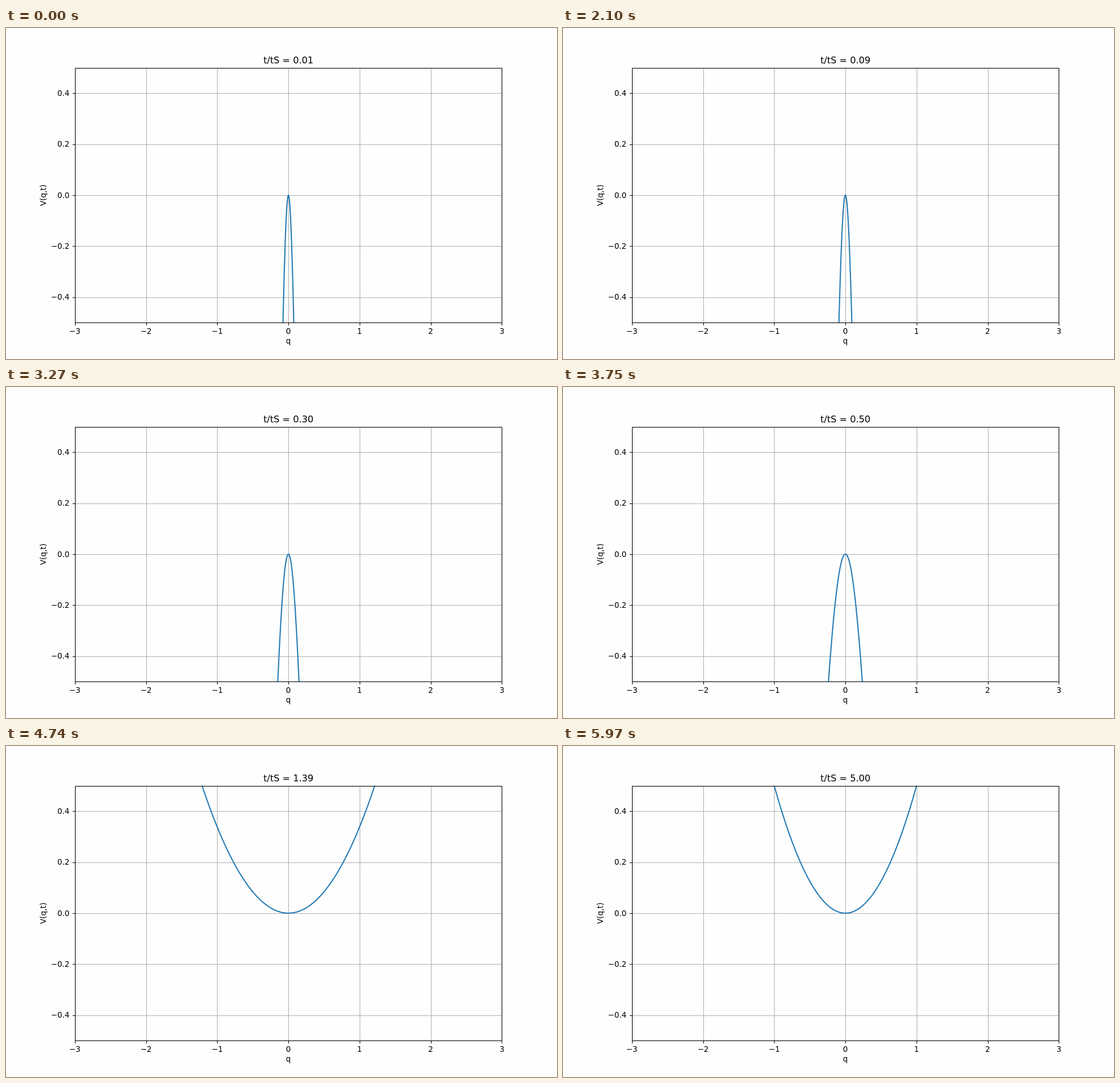
These frames come from a looping animation (966 by 580 pixels, 6 s). An HTML page:

```html
<!DOCTYPE html>
<html lang="en">
<head>
<meta charset="utf-8">
<title>V(q,t)</title>
<style>
  html, body { margin: 0; width: 100%; height: 100%; overflow: hidden; background: #fefefe; }
  svg { display: block; }
  text { font: 13.42px "DejaVu Sans", sans-serif; fill: #000; text-anchor: middle; }
  #title { font-size: 16.1px; }
  .end { text-anchor: end; }
  .grid { stroke: #b0b0b0; stroke-width: 1.07; }
  .axis { stroke: #000; stroke-width: 1.07; fill: none; }
  #curve { fill: none; stroke: #1f77b4; stroke-width: 2.01; stroke-linejoin: round; }
</style>
</head>
<body>
<svg id="stage" width="966" height="580" viewBox="0 0 966 580">
  <clipPath id="plot"><rect x="120.75" y="69.6" width="748.65" height="446.6"/></clipPath>
  <g id="grid"></g>
  <g clip-path="url(#plot)"><path id="curve"/></g>
  <g id="axes"></g>
  <text id="title" x="495.08" y="61.5"></text>
  <text x="495.08" y="553">q</text>
  <text transform="translate(70 293) rotate(-90)">V(q,t)</text>
</svg>
<script>
const LOOP = 6000, STEP = 30, LAST = LOOP / STEP - 1;
const T_MIN = 0.01, T_MAX = 5, DIM = 100, SAMPLES = 1000;
const byId = id => document.getElementById(id);
const px = q => 120.75 + (q + 3) * 748.65 / 6;
const py = v => 292.9 - v * 446.6;
const snap = n => Math.floor(n + 0.5) + 0.5;

function add(parent, tag, attrs, text = '') {
  const el = document.createElementNS('http://www.w3.org/2000/svg', tag);
  for (const key in attrs) el.setAttribute(key, attrs[key]);
  el.textContent = text;
  byId(parent).append(el);
}

function line(parent, cls, x1, y1, x2, y2) {
  add(parent, 'line', { class: cls, x1, y1, x2, y2 });
}

const left = snap(px(-3)), right = snap(px(3));
const top_ = snap(py(0.5)), bottom = snap(py(-0.5));
const minus = s => s.replace('-', '\u2212');

for (let q = -3; q <= 3; q++) {
  const x = snap(px(q));
  line('grid', 'grid', x, top_, x, bottom);
  line('axes', 'axis', x, bottom, x, bottom + 4.7);
  add('axes', 'text', { x: px(q), y: 536 }, minus(String(q)));
}
for (let k = -2; k <= 2; k++) {
  const v = k / 5, y = snap(py(v));
  line('grid', 'grid', left, y, right, y);
  line('axes', 'axis', left - 4.7, y, left, y);
  add('axes', 'text', { class: 'end', x: 111.4, y: Math.round(py(v) + 4.9) }, minus(v.toFixed(1)));
}
add('axes', 'rect', { class: 'axis', x: left, y: top_, width: right - left, height: bottom - top_ });

// Harmonic well minus a log-cosh term that fades as s grows
function potential(q, s) {
  const x = q * DIM ** ((1 - s) / 2);
  return q * q / 2 - 2 * Math.log(Math.cosh(x));
}

function draw(step) {
  const s = T_MIN * (T_MAX / T_MIN) ** (step / LAST);
  let d = '';
  for (let i = 0; i <= SAMPLES; i++) {
    const q = -3 + 6 * i / SAMPLES;
    d += (i ? 'L' : 'M') + px(q).toFixed(2) + ' ' + py(potential(q, s)).toFixed(2);
  }
  byId('curve').setAttribute('d', d);
  byId('title').textContent = 't/tS = ' + s.toFixed(2);
}

const start = performance.now();
let shown = -1;
function tick() {
  const step = Math.floor((performance.now() - start) % LOOP / STEP);
  if (step !== shown) draw(shown = step);
  requestAnimationFrame(tick);
}
tick();
</script>
</body>
</html>
```
